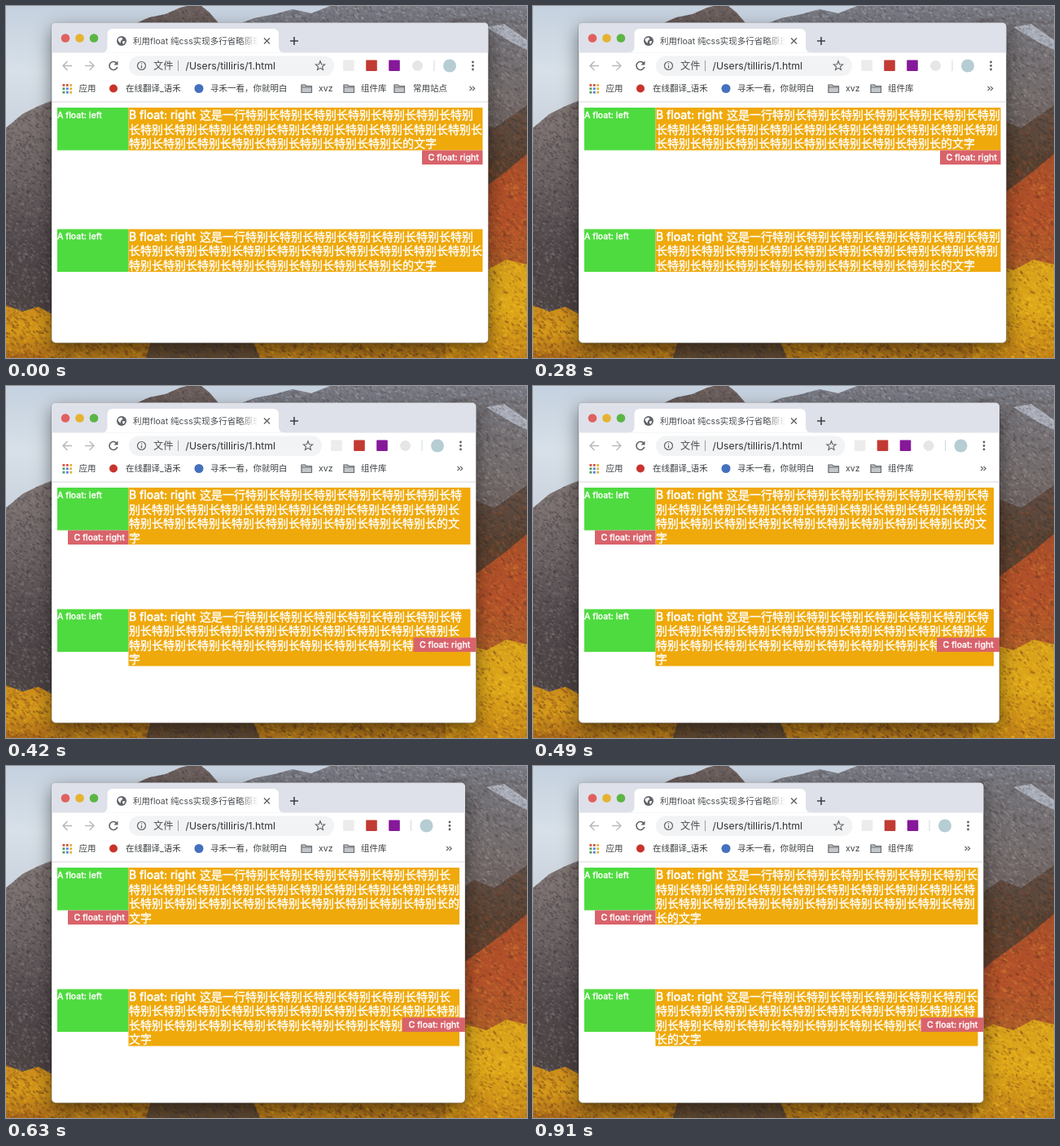
Animation of 640 by 433 pixels, one loop 0.98 s. Source, as an HTML page with a canvas:

```html
<!DOCTYPE html>
<html lang="zh-CN">
<head>
<meta charset="utf-8">
<style>
  html, body { margin: 0; width: 100%; height: 100%; overflow: hidden; }
  canvas { display: block; }
</style>
</head>
<body>
<canvas id="stage" width="640" height="433"></canvas>
<script>
const W = 640, H = 433, STEP = 70;
const LEFT = 56, TOP = 20.5, BOTTOM = 414.5;
const CHAR = 14, LINE = 17.5, TEXT_X = 151, FIRST_X = 238;
// Right edge of the window at every step of the drag
const edges = [592.5, 588, 584, 582.5, 581.5, 580, 577.5, 573, 567, 564, 560, 557, 555, 553.5];
const sentence = '这是一行' + '特别长'.repeat(25) + '的文字';
const family = 'Inter, "Noto Sans CJK SC", "Noto Sans CJK JP", sans-serif';
const stage = document.getElementById('stage');
let ctx = stage.getContext('2d');

let seed = 7;
const rand = () => (seed = seed * 16807 % 2147483647) / 2147483647;

function rect(x, y, w, h, color) {
  ctx.fillStyle = color;
  ctx.fillRect(x, y, w, h);
}
function round(x, y, w, h, r, color) {
  ctx.fillStyle = color;
  ctx.beginPath();
  ctx.roundRect(x, y, w, h, r);
  ctx.fill();
}
function dot(x, y, r, color) {
  ctx.fillStyle = color;
  ctx.beginPath();
  ctx.arc(x, y, r, 0, 7);
  ctx.fill();
}
function path(d, color, width = 1.4) {
  ctx.strokeStyle = color;
  ctx.lineWidth = width;
  ctx.stroke(new Path2D(d));
}
function shape(d, color) {
  ctx.fillStyle = color;
  ctx.fill(new Path2D(d));
}
function vertical(y0, y1, ...colors) {
  const g = ctx.createLinearGradient(0, y0, 0, y1);
  colors.forEach((c, i) => g.addColorStop(i / (colors.length - 1), c));
  return g;
}
function text(str, x, y, size, color, weight = 400) {
  ctx.font = `${weight} ${size}px ${family}`;
  ctx.fillStyle = color;
  ctx.fillText(str, x, y);
}
// White text with slightly heavier strokes
function heavyText(str, x, y, size) {
  text(str, x, y, size, '#fff', 500);
  ctx.strokeStyle = '#fff';
  ctx.lineWidth = size / 40;
  ctx.strokeText(str, x, y);
}

// A filled outline covered with small blobs; box is [x, y, width, height]
function terrain(d, fill, [x, y, w, h], size, colors) {
  ctx.save();
  ctx.clip(new Path2D(d));
  rect(x, y, w, h, fill);
  for (let i = w * h / (size * size * 2); i > 0; i--) {
    ctx.globalAlpha = 0.15 + rand() * 0.4;
    ctx.fillStyle = colors[rand() * colors.length | 0];
    ctx.beginPath();
    ctx.ellipse(x + rand() * w, y + rand() * h, size * (0.5 + rand()), size * (0.3 + rand() * 0.4), 0.2 + rand() * 0.8, 0, 7);
    ctx.fill();
  }
  ctx.restore();
}

function paintLandscape() {
  rect(0, 0, W, H, vertical(0, 160, '#c5d1df', '#d7e0e8', '#c9d2dc'));
  terrain('M158 22L176 14L196 10L214 2L222 0H240L250 8L262 22Z', '#6a5e5c',
    [150, 0, 115, 24], 1.6, ['#4c4345', '#887a74', '#655857']);
  terrain('M286 22L305 15L330 10L352 4L375 9L398 0H640V24Z', '#787982',
    [286, 0, 354, 24], 1.8, ['#54545c', '#a9adb8', '#6b6769', '#8b8d96']);
  terrain('M540 18L600 8L640 16V210H540Z', vertical(18, 200, '#73737b', '#746c6b', '#62544f'),
    [540, 8, 100, 202], 2, ['#534b4b', '#8b8584', '#65595a', '#9a9699']);
  terrain('M590 26L612 22L640 42V54L620 44Z', '#a9adb8',
    [590, 20, 50, 36], 1.8, ['#c4c8d1', '#77777f']);

  terrain('M0 150L20 133L40 123L60 115V390H0Z', vertical(120, 380, '#847a78', '#6b6263', '#50484b', '#4b4241'),
    [0, 110, 60, 280], 1.8, ['#8c817f', '#4a4246', '#6c6263', '#3e373b']);
  terrain('M540 165L575 140L600 150L640 122V270H540Z', vertical(130, 260, '#5f4e46', '#57402f', '#74432c'),
    [540, 120, 100, 150], 2.2, ['#3f332e', '#8a4a2c', '#6d5a4c', '#4c3a30']);
  terrain('M540 262L565 240L590 222L615 203L640 182V345H540Z', vertical(190, 330, '#a8502a', '#b4512a', '#aa5f28'),
    [540, 180, 100, 165], 2.2, ['#cc6a30', '#74331f', '#b8472a', '#8a4d2a', '#d37e34']);
  terrain('M540 330L565 318L590 325L615 312L640 318V433H540Z', vertical(315, 433, '#d6a01c', '#dea81a', '#c08017'),
    [540, 310, 100, 123], 2.2, ['#efc026', '#b0701a', '#dd9f18', '#7e4c1a', '#f0b81d']);
  terrain('M0 368L20 376L40 370L60 381V433H0Z', vertical(368, 433, '#c98a1e', '#d59a1a', '#a9681a'),
    [0, 366, 60, 67], 2.2, ['#e9b420', '#8d521a', '#d18a17', '#6a3f1c']);
  terrain('M56 405H540V433H56Z', '#b3781c',
    [56, 405, 484, 28], 2.2, ['#e0a41c', '#7a481c', '#c98119', '#5b3a20']);
  terrain('M172 433L180 405H300L312 433Z', '#5f4934',
    [170, 405, 144, 28], 2.2, ['#3e312d', '#866029', '#594b47', '#6f4a26']);
}

function paintWindowFrame(right) {
  ctx.save();
  ctx.shadowColor = 'rgba(0,0,0,.5)';
  ctx.shadowBlur = 22;
  ctx.shadowOffsetY = 8;
  round(LEFT, TOP, right - LEFT, BOTTOM - TOP, 5, '#fff');
  ctx.restore();
  ctx.strokeStyle = 'rgba(60,60,60,.35)';
  ctx.lineWidth = 1;
  ctx.stroke();
  ctx.beginPath();
  ctx.roundRect(LEFT, TOP, right - LEFT, BOTTOM - TOP, 5);
  ctx.clip();
}

function paintTabs(right) {
  rect(LEFT, TOP, right - LEFT, 37, '#dee1e9');
  dot(73, 39.5, 5.3, '#e0605f');
  dot(90.5, 39.5, 5.3, '#e5b32f');
  dot(108, 39.5, 5.3, '#5bb545');
  shape('M117 57.5Q124.5 57.5 124.5 50V35Q124.5 28 131.5 28H328Q335 28 335 35V50Q335 57.5 342 57.5Z', '#fff');
  dot(142, 43, 6, '#5f6368');
  shape('M138 40l4-1.5 1.5 2-2.5 2.5-.5 3-2.8-3.5zM143.5 43l3 .5-2 3.5-1.5-1.5z', '#fff');
  const fade = ctx.createLinearGradient(286, 0, 310, 0);
  fade.addColorStop(0, '#45494d');
  fade.addColorStop(1, 'rgba(69,73,77,0)');
  text('利用float 纯css实现多行省略原理', 156, 47, 10.5, fade);
  path('M317 39.5l7 7m0-7l-7 7', '#5f6368');
  path('M349 43h10m-5-5v10', '#3c4043', 1.6);
}

function paintToolbar(right) {
  path('M81 73.5H70m5.5-5.5L70 73.5l5.5 5.5', '#b4b6b9');
  path('M97 73.5h11m-5.5-5.5l5.5 5.5-5.5 5.5', '#b9bbbe');
  path('M136 70.5A5 5 0 1 0 136.8 75', '#5f6368', 1.6);
  shape('M137.5 67.5v5h-5z', '#5f6368');

  // A narrow window hides the last extension
  const wide = right > 570;
  const icon = right - (wide ? 171.5 : 143);
  round(151, 61.5, icon - 18 - 151, 24.5, 12.2, '#f1f3f4');
  path('M171.5 73.5a5 5 0 1 0-10 0a5 5 0 1 0 10 0M166.5 73v3.5M166.5 70.5v1.2', '#5f6368', 1.2);
  text('文件', 181, 78, 12.25, '#4d5156');
  rect(211, 67, 1, 13, '#9aa0a6');
  text('/Users/tilliris/1.html', 220.5, 78, 12.25, '#303235');

  const star = icon - 35;
  let d = '';
  for (let i = 0; i < 10; i++) {
    const r = i % 2 ? 2.6 : 6, a = i * Math.PI / 5;
    d += `${i ? 'L' : 'M'}${star + r * Math.sin(a)} ${73.8 - r * Math.cos(a)}`;
  }
  path(d + 'Z', '#5f6368', 1.1);

  ['#ececec', '#c23b33', '#86189a'].forEach((color, i) =>
    round(icon + 28 * i - 6.8, 66.5, 13.6, 13.6, 1, color));
  if (wide) dot(icon + 84.5, 73.5, 6.5, '#e6e6e6');
  rect(right - 67, 67, 1, 13, '#d5d7da');
  dot(right - 47.5, 73.5, 8, '#b5cdd3');
  for (const y of [69, 73.5, 78]) dot(right - 19, y, 1.4, '#5f6368');
}

function folder(x, label) {
  shape(`M${x - 6.5} 96.5h5l1.5 1.5h6.5v8.8h-13z`, '#c4c7ca');
  path(`M${x - 6} 97h4.5l1.5 1.5h6.5v8h-12.5zM${x - 6} 100h12.5`, '#6c7075', 1.2);
  text(label, x + 15, 105, 10.5, '#3c4043');
}

function paintBookmarks(right) {
  const colors = ['#d95040', '#d95040', '#e5b13a', '#4a9c5b', '#4b82df', '#e5b13a', '#4a9c5b', '#4b82df', '#e5b13a'];
  colors.forEach((c, i) => rect(69.5 + i % 3 * 4.4, 96 + (i / 3 | 0) * 4.4, 2.8, 2.8, c));
  text('应用', 89.5, 105, 10.5, '#3c4043');
  dot(132, 101.5, 5, '#c8342c');
  text('在线翻译_语禾', 147, 105, 10.5, '#3c4043');
  dot(237, 101.5, 5.5, '#4470bd');
  text('寻禾一看，你就明白', 251, 105, 10.5, '#3c4043');
  folder(369, 'xvz');
  folder(421, '组件库');
  if (right > 586) folder(483, '\u2009常用站点');
  const x = right - 23;
  path(`M${x} 98.8l2.7 2.7-2.7 2.7m3.5-5.4l2.7 2.7-2.7 2.7`, '#5f6368', 1.2);
  rect(LEFT, 117.5, right - LEFT, 1, '#d9dadc');
}

function label(x, y, width) {
  rect(x, y, width, LINE, '#d9636b');
  heavyText('C float: right', x + 7.5, y + 12.3, 10.5);
}

// Green, orange and red floats; the sentence wraps to the width left for it
function paintFloats(y, end, placeLabel) {
  const first = Math.floor((end - FIRST_X) / CHAR);
  const rest = Math.floor((end - TEXT_X) / CHAR);
  const lines = [sentence.slice(0, first)];
  for (let i = first; i < sentence.length; i += rest) lines.push(sentence.slice(i, i + rest));

  rect(63, y, 87.5, LINE * 3, '#4edb3f');
  heavyText('A float: left', 63, y + 12.5, 10.5);
  rect(150.5, y, end - 150.5, LINE * lines.length, '#efa90b');
  heavyText('B float: right', TEXT_X, y + 14, CHAR);
  lines.forEach((line, i) =>
    heavyText(line, i ? TEXT_X : FIRST_X, y + 14 + i * LINE, CHAR));
  placeLabel(lines.length > 3);
}

const landscape = document.createElement('canvas');
landscape.width = W;
landscape.height = H;
const screen = ctx;
ctx = landscape.getContext('2d');
paintLandscape();
ctx = screen;

function paint(right) {
  const end = right - 7;
  ctx.drawImage(landscape, 0, 0);
  ctx.save();
  paintWindowFrame(right);
  paintTabs(right);
  paintToolbar(right);
  paintBookmarks(right);
  paintFloats(125, end, overflow => label(overflow ? 76 : end - 74.5, 177.5, 74.5));
  paintFloats(274.5, end, overflow => overflow && label(right - 77, 309.5, 77));
  ctx.restore();
}

let shown = -1;
function tick(now) {
  const step = Math.floor(now / STEP) % edges.length;
  if (step !== shown) paint(edges[shown = step]);
  requestAnimationFrame(tick);
}
paint(edges[0]);
requestAnimationFrame(tick);
</script>
</body>
</html>
```
